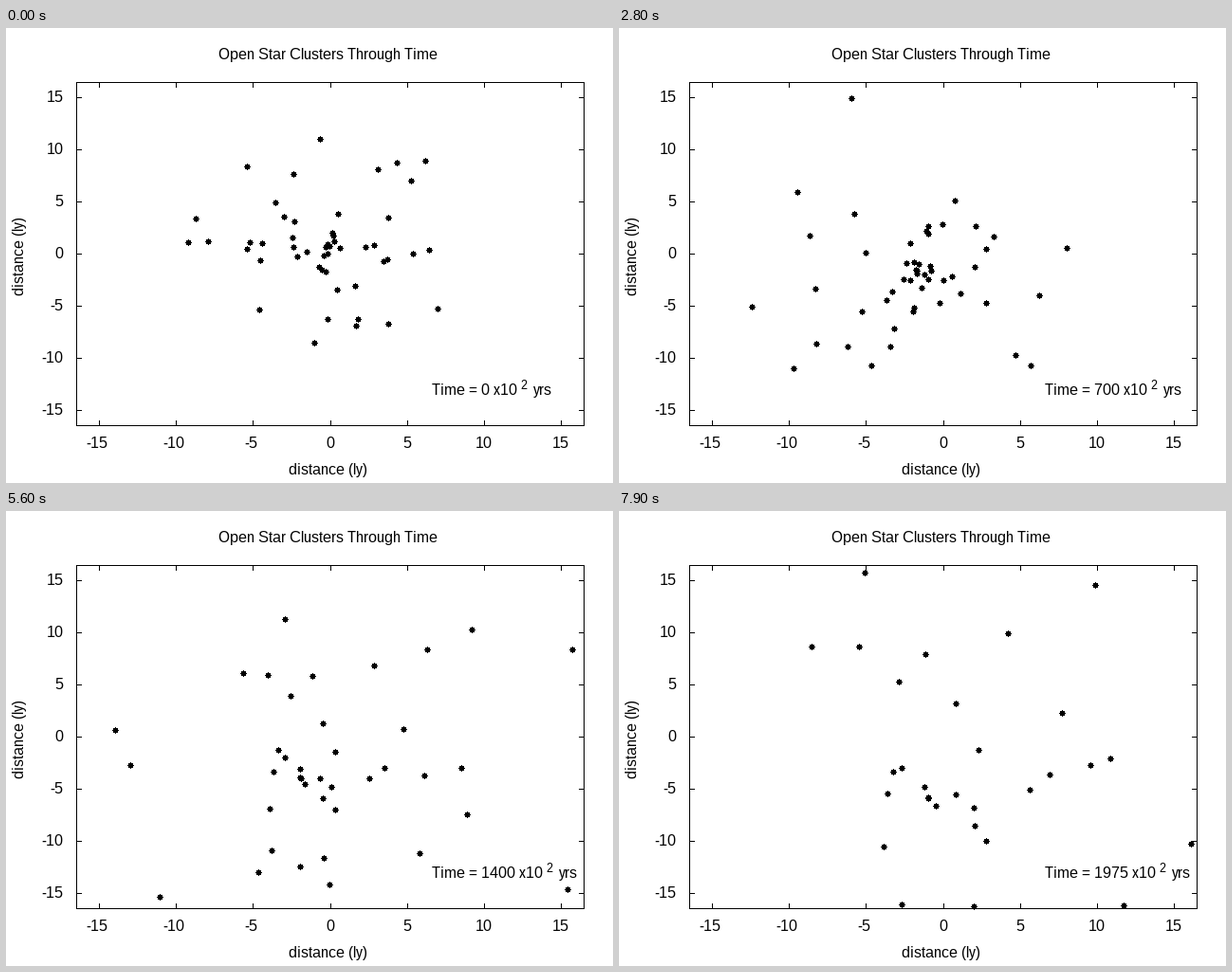
Write a matplotlib script that moves like this. It is 640 by 480 pixels and loops after 8 s.

```python
import numpy as np
import matplotlib.pyplot as plt
from matplotlib.animation import FuncAnimation
from matplotlib.collections import PolyCollection

W, H, DPI = 640, 480, 80
PX = 72 / DPI                       # one pixel in points
LEFT, RIGHT, TOP, BOTTOM = 74, 609, 57, 419
LIMIT = 16.5                        # axis range in light years
FRAMES, STEP = 80, 25
STARS = 50

plt.rcParams.update({"font.family": "Liberation Sans",
                     "text.hinting": "default", "text.hinting_factor": 1})
fig = plt.figure(figsize=(W / DPI, H / DPI), dpi=DPI, facecolor="white")
ax = fig.add_axes([0, 0, 1, 1])
ax.set(xlim=(0, W), ylim=(H, 0))
ax.axis("off")


def label(x, y, s, ha="center", size=16, **kw):
    return ax.text(x, y, s, ha=ha, va="baseline", size=size * PX, color="black", **kw)


def line(xs, ys):
    ax.plot(xs, ys, color="black", lw=PX, antialiased=False,
            solid_capstyle="butt", solid_joinstyle="miter")


# Frame, ticks and labels
line([LEFT, RIGHT, RIGHT, LEFT, LEFT], [TOP, TOP, BOTTOM, BOTTOM, TOP])
for v in range(-15, 16, 5):
    x = round(LEFT + (v + LIMIT) / (2 * LIMIT) * (RIGHT - LEFT))
    y = round(BOTTOM - (v + LIMIT) / (2 * LIMIT) * (BOTTOM - TOP))
    for a, b in ((TOP, TOP + 5), (BOTTOM - 5, BOTTOM)):
        line([x, x], [a, b])
    for a, b in ((LEFT, LEFT + 5), (RIGHT - 5, RIGHT)):
        line([a, b], [y, y])
    label(x - 2 * (v < 0), 443, str(v))
    label(60.6, y + 5, str(v), "right")
label(340, 33, "Open Star Clusters Through Time")
label(339, 471, "distance (ly)")
label(19, 240, "distance (ly)", rotation=90, rotation_mode="anchor")

# Clock: the exponent and unit follow the width of the number
clock = label(449, 387, "", "left")


def follow(prev, s, base, gap, size):
    return ax.annotate(s, (1, base), xycoords=(prev, ax.transData), xytext=(gap, 0),
                       textcoords="offset pixels", ha="left", va="baseline",
                       size=size * PX, color="black")


power = follow(clock, "2", 381, 3, 12.8)
follow(power, "yrs", 387, 6.5, 16)

# Each star keeps its own infall and spin, as fractions of its start radius
rng = np.random.default_rng(7)
radius = 150 * np.linspace(0.02, 1, STARS) ** 1.2
start = radius * np.exp(1j * rng.uniform(0, 2 * np.pi, STARS))
infall = rng.uniform(0, 0.06, STARS)
spin = rng.uniform(0.01, 0.055, STARS)


def positions(t):
    """The cluster falls together, swings round its drifting core and scatters."""
    squeeze = 1 - 0.25 * np.exp(-((t - 20) / 8) ** 2)
    z = start * (1 - (infall + 1j * spin) * t) * squeeze
    x = 338 - 25 * np.sin(np.pi * t / FRAMES) + z.real
    y = 232 + 0.95 * t + 0.85 * z.imag
    return np.rint(np.column_stack([x, y]))


# Dot: a 5 px block with a 1 px nub on each side
quarter = np.array([(2.5, -2.5), (2.5, -0.5), (3.5, -0.5), (3.5, 0.5), (2.5, 0.5)])
turn = np.array([(0, 1), (-1, 0)])
dot = np.vstack([quarter @ np.linalg.matrix_power(turn, q) for q in range(4)]) + 0.5
dots = PolyCollection([], facecolor="black", edgecolor="none", lw=0,
                      antialiased=False, snap=False, zorder=3)
ax.add_collection(dots, autolim=False)


def update(frame):
    inside = [p for p in positions(frame)
              if LEFT <= p[0] <= RIGHT and TOP <= p[1] <= BOTTOM]
    dots.set_verts([dot + p for p in inside])
    clock.set_text(f"Time = {frame * STEP} x10")
    return dots, clock


anim = FuncAnimation(fig, update, frames=FRAMES, interval=100, repeat=True,
                     repeat_delay=0, blit=False)
plt.show()
```
